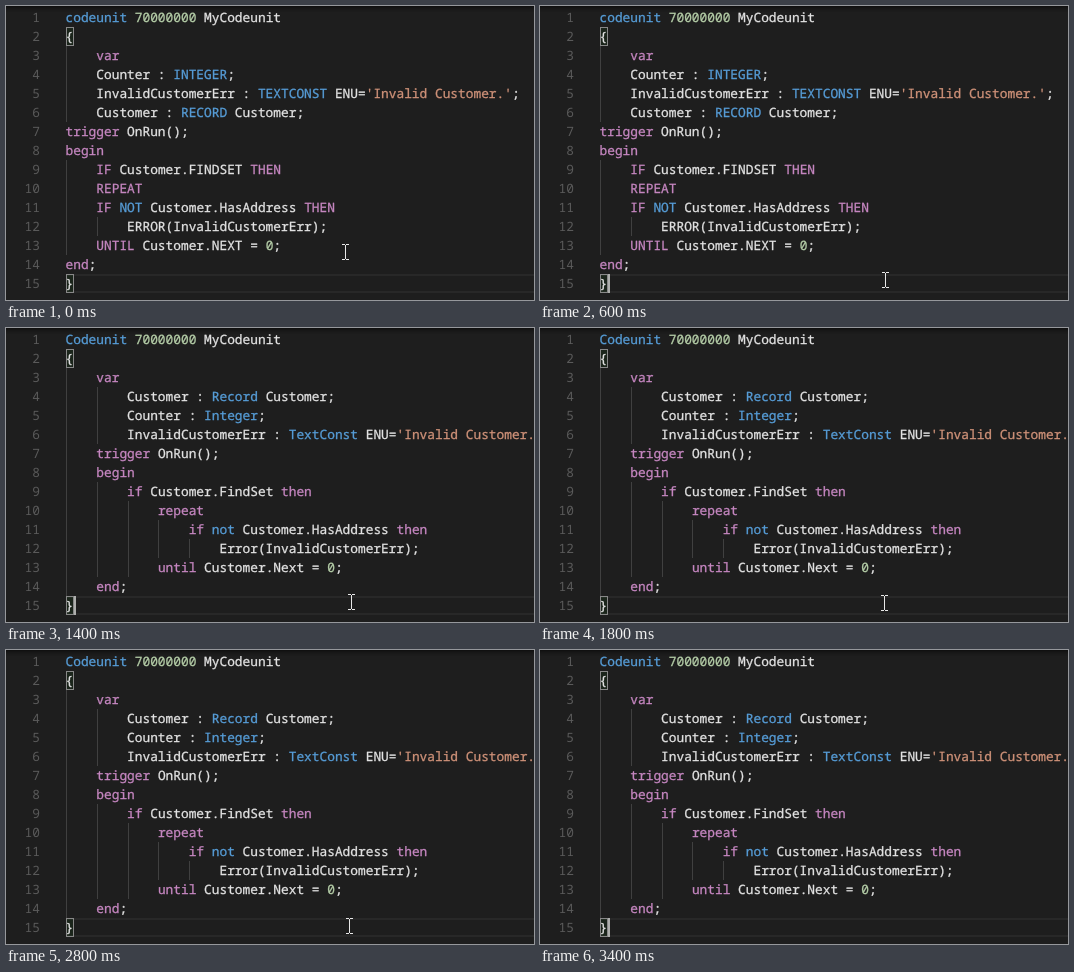
These frames come from a looping animation (528x294 px, 3.6 s). An HTML page:

```html
<!DOCTYPE html>
<html lang="en">
<head>
<meta charset="utf-8">
<title>Code formatting</title>
<style>
  html, body { margin: 0; width: 100%; height: 100%; overflow: hidden; background: #1e1e1e; }
  #stage { position: relative; width: 528px; height: 294px; overflow: hidden; background: #1e1e1e; }
  #stage > * { position: absolute; }
  pre {
    margin: 0; top: 2px; color: #e2e2e2;
    font: 12.83px/19px "Noto Sans Mono", monospace;
    text-rendering: geometricPrecision;
  }
  .code { left: 59.5px; -webkit-text-stroke: .3px; }
  #numbers { left: 0; width: 34px; text-align: right; color: #5a5a5a; }
  .control { color: #c586c0; }
  .type { color: #569cd6; }
  .number { color: #b5cea8; }
  .string { color: #ce9178; }
  .guide { position: absolute; width: 1px; height: 19px; background: #404040; }
  .bracket {
    left: 60px; width: 8px; height: 19px; box-sizing: border-box;
    border: 1px solid #888; background: rgba(0, 100, 0, .1);
  }
  #current {
    left: 60px; right: 0; top: 268px; height: 19px; box-sizing: border-box;
    border: solid #282828; border-width: 2px 0;
  }
  #caret { left: 68px; top: 268px; width: 2px; height: 19px; background: #aeafad; }
  #shade { left: 0; top: 0; width: 100%; height: 6px; box-shadow: inset 0 6px 6px -6px #000; }
  #pointer { left: 0; top: 0; fill: none; stroke: #e8e8e8; }
</style>
</head>
<body>
<div id="stage">
  <div id="current"></div>
  <div class="bracket" style="top:21px"></div>
  <div class="bracket" style="top:268px"></div>
  <pre id="numbers"></pre>
  <pre class="code" id="before">codeunit 70000000 MyCodeunit
{
    var
    Counter : INTEGER;
    InvalidCustomerErr : TEXTCONST ENU='Invalid Customer.';
    Customer : RECORD Customer;
trigger OnRun();
begin
    IF Customer.FINDSET THEN
    REPEAT
    IF NOT Customer.HasAddress THEN
        ERROR(InvalidCustomerErr);
    UNTIL Customer.NEXT = 0;
end;
}</pre>
  <pre class="code" id="after">Codeunit 70000000 MyCodeunit
{
    var
        Customer : Record Customer;
        Counter : Integer;
        InvalidCustomerErr : TextConst ENU='Invalid Customer.';
    trigger OnRun();
    begin
        if Customer.FindSet then
            repeat
                if not Customer.HasAddress then
                    Error(InvalidCustomerErr);
            until Customer.Next = 0;
    end;
}</pre>
  <div id="caret"></div>
  <div id="shade"></div>
  <svg id="pointer" width="7" height="16"><path d="M0 .5h3m1 0h3M3.5 1v14M0 15.5h3m1 0h3"/></svg>
</div>
<script>
const LOOP = 3600, CHAR_WIDTH = 7.698, LINE_HEIGHT = 19;
const $ = id => document.getElementById(id);

const rules = [
  ["string", /'[^']*'/],
  ["control", /\b(?:var|trigger|begin|end|if|then|repeat|until)\b/],
  ["type", /\b(?:codeunit|integer|textconst|record|not)\b/],
  ["number", /\b\d+\b/],
];
const tokens = new RegExp(rules.map(([, rule]) => `(${rule.source})`).join("|"), "gi");

function highlight(text) {
  return text.replace(tokens, (token, ...groups) => {
    const kind = rules.findIndex((_, i) => groups[i] !== undefined);
    return `<span class="${rules[kind][0]}">${token}</span>`;
  });
}

function indentGuides(text) {
  let html = "";
  text.split("\n").forEach((line, row) => {
    for (let col = 0; col < line.search(/\S/); col += 4) {
      const x = Math.round(col * CHAR_WIDTH) + 0.5;
      html += `<i class="guide" style="left:${x}px;top:${row * LINE_HEIGHT}px"></i>`;
    }
  });
  return html;
}

for (const id of ["before", "after"]) {
  const text = $(id).textContent;
  $(id).innerHTML = indentGuides(text) + highlight(text);
}
$("numbers").textContent = Array.from({ length: 15 }, (_, i) => i + 1).join("\n");

// [start time, left, top]
const pointerStops = [
  [0, 336, 238], [200, 337, 253], [400, 342, 266], [1600, 341, 267], [2800, 340, 268],
];
const caretOn = [[600, 1000], [1400, 1800], [2400, 2800], [3400, LOOP]];

const show = (id, visible) => { $(id).style.visibility = visible ? "visible" : "hidden"; };

function render() {
  const t = performance.now() % LOOP;
  show("before", t < 1400);
  show("after", t >= 1400);
  show("caret", caretOn.some(([from, to]) => t >= from && t < to));
  show("pointer", t < 3200);
  const [, x, y] = pointerStops.filter(([start]) => start <= t).pop();
  $("pointer").style.transform = `translate(${x}px, ${y}px)`;
  requestAnimationFrame(render);
}
render();
</script>
</body>
</html>
```
